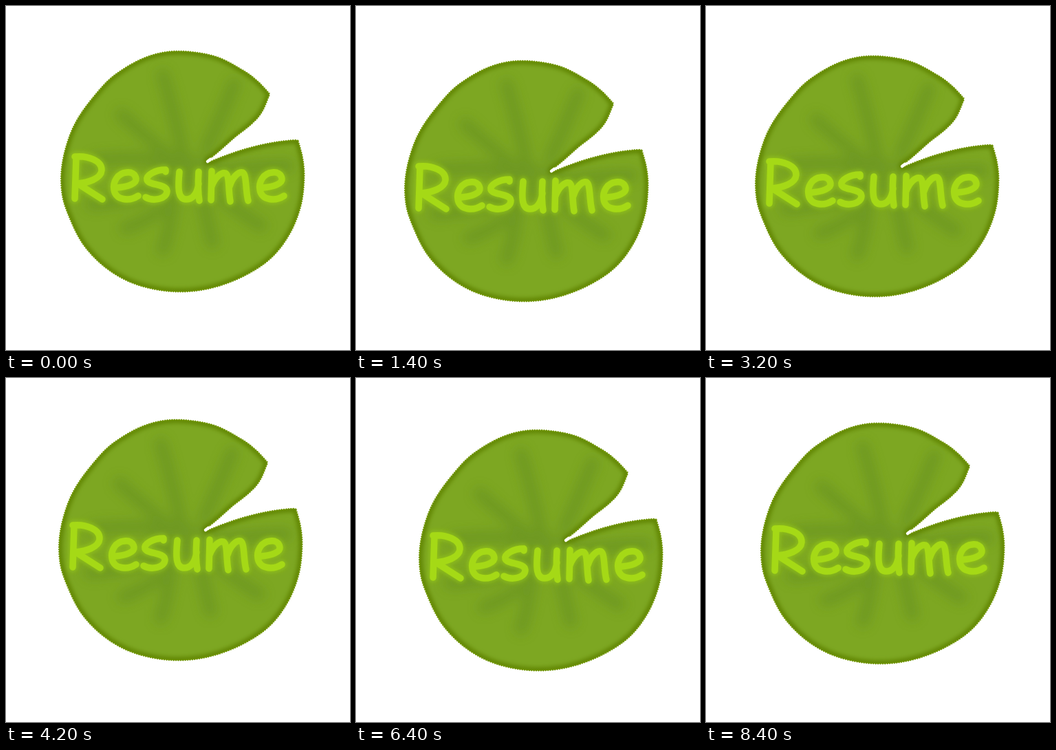
Recreate the animation shown at these times as an HTML page. Size 500x500 px, loop 8500 ms.

```html
<!DOCTYPE html>
<html lang="en">
<head>
<meta charset="utf-8">
<title>Resume</title>
<style>
html, body { margin: 0; width: 100%; height: 100%; overflow: hidden; background: #fff; }
svg { display: block; width: 100%; height: 100%; }
.line { fill: none; stroke-linecap: round; stroke-linejoin: round; }
</style>
</head>
<body>
<svg viewBox="0 0 500 500" role="img" aria-label="Resume">
  <defs>
    <path id="leaf"/>
    <clipPath id="inside"><use href="#leaf"/></clipPath>
    <filter id="soft" filterUnits="userSpaceOnUse" x="40" y="40" width="420" height="420"><feGaussianBlur stdDeviation="8"/></filter>
    <filter id="edge" filterUnits="userSpaceOnUse" x="40" y="40" width="420" height="420"><feGaussianBlur stdDeviation="3"/></filter>
    <filter id="glow" filterUnits="userSpaceOnUse" x="60" y="180" width="380" height="140"><feGaussianBlur stdDeviation="3"/></filter>
    <g id="word">
      <path d="M102 220L100 280M100 219C119 217 140 225 139 239C138 251 119 257 104 258L140 281"/>
      <path id="e" d="M162 264C177 263 190 258 189 251C188 244 182 241 175 242C162 243 155 256 157 267C159 283 180 284 192 276"/>
      <path d="M232 241L232 238C217 238 203 246 205 253C208 261 233 258 234 269C234 281 214 284 203 278"/>
      <path d="M252 241C250 262 249 281 262 281C272 281 278 272 280 258M280 241C279 256 279 271 281 283"/>
      <path d="M299 240L298 282M299 262C304 249 313 241 319 243C325 246 323 268 326 284M325 262C329 249 338 240 344 242C350 245 348 269 352 283"/>
      <use href="#e" x="212"/>
    </g>
  </defs>
  <g id="pad">
    <use href="#leaf" fill="#7da722"/>
    <g clip-path="url(#inside)" class="line">
      <g filter="url(#soft)" stroke="#6b9422" stroke-width="18" opacity=".75">
        <path d="M258 222Q246 160 228 100M292 206Q313 160 332 113M240 220Q200 187 168 158M262 225Q190 218 130 224M235 265Q180 285 125 288M226 296Q205 312 174 323M244 270Q240 320 228 354M284 270Q292 310 300 344M316 280Q342 302 370 319M295 245Q350 232 410 232"/>
        <path d="M235 236L292 242" stroke-width="50" opacity=".7"/>
      </g>
      <use href="#leaf" stroke="#5f8300" stroke-width="7" filter="url(#edge)"/>
    </g>
    <use href="#leaf" class="line" stroke="#6f9405" stroke-width="1.4"/>
    <path class="line" d="M293 226L297 223" stroke="#fff" stroke-width="4.5"/>
    <use href="#word" class="line" stroke="#9bcf16" stroke-width="13" filter="url(#glow)" opacity=".65"/>
    <use href="#word" class="line" stroke="#a5d916" stroke-width="9.5"/>
  </g>
</svg>
<script>
const leaf = document.getElementById('leaf');
const pad = document.getElementById('pad');

const rim = [[424,195],[431,222],[433,252],[428,291],[412,331],[385,366],[346,392],[301,409],
  [257,415],[214,411],[174,398],[139,375],[111,344],[92,306],[82,274],[81,238],[89,200],
  [104,165],[131,128],[159,100],[203,75],[248,66],[302,73],[343,93],[366,110],[383,128]];
const notch = 'C377 142 374 155 361 167C352 176 342 183 334 189C319 202 306 215 292 224' +
  'Q290 228 296 227C331 212 376 197 424 195Z';

// Catmull-Rom spline through the points
function spline(pts) {
  const at = i => pts[Math.max(0, Math.min(pts.length - 1, i))];
  let d = `M${pts[0]}`;
  for (let i = 0; i < pts.length - 1; i++) {
    const [a, b, c, e] = [at(i - 1), at(i), at(i + 1), at(i + 2)];
    const c1 = [0, 1].map(k => b[k] + (c[k] - a[k]) / 6);
    const c2 = [0, 1].map(k => c[k] - (e[k] - b[k]) / 6);
    d += `C${c1} ${c2} ${c}`;
  }
  return d;
}

// Fine saw teeth along the outline
function serrate(d, step, depth) {
  leaf.setAttribute('d', d);
  const len = leaf.getTotalLength();
  const n = Math.round(len / step);
  let out = `M${rim[0]}`;
  for (let i = 1; i < n; i++) {
    const s = i * len / n;
    const p = leaf.getPointAtLength(s - 0.5), q = leaf.getPointAtLength(s + 0.5);
    const h = Math.hypot(q.x - p.x, q.y - p.y) || 1;
    const off = (i % 2 ? depth : -depth) / h;
    const x = (p.x + q.x) / 2 + (q.y - p.y) * off;
    const y = (p.y + q.y) / 2 - (q.x - p.x) * off;
    out += `L${x.toFixed(2)} ${y.toFixed(2)}`;
  }
  return out + 'Z';
}

leaf.setAttribute('d', serrate(spline(rim) + notch, 1.7, 0.8));

// Drift between stops in whole pixels, ten steps a second
const LOOP = 8500, TICK = 100, LEG = 21;
const stops = [[0, 0], [-14, 21], [-3, -5], [13, 10], [0, 0]];

function draw(ms) {
  const tick = Math.floor((ms % LOOP) / TICK);
  const leg = Math.min(3, Math.floor(tick / LEG));
  const f = (tick - leg * LEG) / LEG;
  const [x, y] = stops[leg].map((v, k) => Math.round(v + (stops[leg + 1][k] - v) * f));
  pad.setAttribute('transform', `translate(${x} ${y})`);
}

const start = performance.now();
function frame() {
  draw(performance.now() - start);
  requestAnimationFrame(frame);
}
frame();
</script>
</body>
</html>
```
